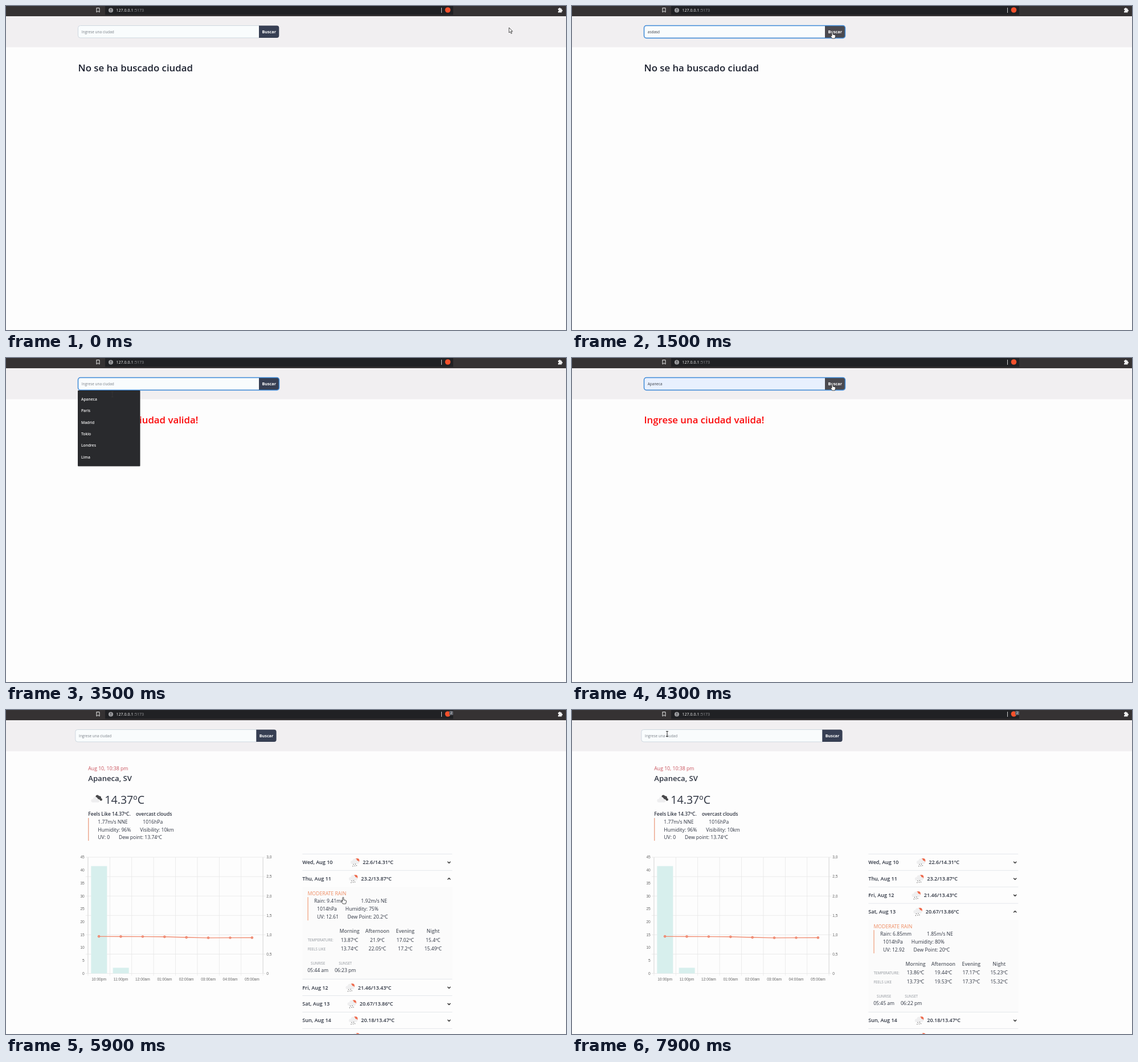
An HTML page with a canvas that plays this animation: 983x570 px, repeating every 8000 ms.

```html
<!DOCTYPE html>
<html lang="es">
<head>
<meta charset="utf-8">
<title>Clima</title>
<style>
html, body { margin: 0; width: 100%; height: 100%; overflow: hidden; background: #fdfdfd; }
canvas { display: block; }
</style>
</head>
<body>
<canvas id="stage" width="983" height="570"></canvas>
<script>
const c = document.getElementById('stage').getContext('2d');
const LOOP = 8000, STEP = 100, INK = '#2d3340', ORANGE = '#ee8a5f';
const UI = '"Open Sans", "Noto Sans", sans-serif', CHART = '"Liberation Sans", Arial, sans-serif';
const ROW = 28.95, PANEL = 162.3, LIST_TOP = 253.3;

// time, x, y, shape of the pointer
const pointer = [
  [0, 883, 38, 'arrow'], [100, 840, 45, 'arrow'], [300, 485, 79, 'arrow'], [500, 210, 52, 'beam'],
  [600, 202, 50, 'beam'], [1200, 202, 50, 'beam'], [1500, 457, 45, 'hand'], [1800, 457, 45, 'hand'],
  [1900, 423, 72, 'arrow'], [2000, 385, 90, 'arrow'], [2100, 304, 155, 'arrow'], [2200, 263, 187, 'arrow'],
  [2300, 263, 187, 'arrow'], [2400, 215, 110, 'arrow'], [2500, 194, 46, 'beam'], [2600, 194, 46, 'beam'],
  [2800, 197, 60, 'beam'], [2900, 196, 52, 'beam'], [3300, 196, 52, 'beam'], [3600, 182, 70, 'arrow'],
  [3800, 182, 70, 'arrow'], [4100, 457, 45, 'hand'], [4600, 457, 45, 'hand'], [4900, 500, 150, 'arrow'],
  [5200, 586, 276, 'hand'], [5300, 588, 282, 'hand'], [5500, 588, 290, 'hand'], [5800, 588, 292, 'hand'],
  [6200, 603, 440, 'beam'], [6400, 605, 484, 'hand'], [6600, 605, 484, 'hand'], [6700, 605, 484, 'beam'],
  [7000, 605, 512, 'hand'], [7200, 605, 512, 'hand'], [7500, 470, 330, 'arrow'], [7700, 290, 150, 'arrow'],
  [7900, 167, 42, 'beam'], [8000, 167, 42, 'beam']
];

const days = [
  ['Wed, Aug 10', 631, '22.6/14.31ºC'], ['Thu, Aug 11', 628, '23.2/13.87ºC'],
  ['Fri, Aug 12', 622.5, '21.46/13.43ºC'], ['Sat, Aug 13', 625.5, '20.67/13.86ºC'],
  ['Sun, Aug 14', 628, '20.18/13.47ºC'], ['Mon, Aug 15', 631.5, '19.33/13.89ºC'],
  ['Tue, Aug 16', 627, '18.58/13.94ºC'], ['Wed, Aug 17', 631, '19.06/13.54ºC']
];

const panels = {
  1: { from: 5530, to: 6515, rain: '9.41mm', wind: '1.92m/s NE', windX: 628, hum: '75%', uv: '12.61', dew: '20.2ºC',
    temp: ['13.87', '21.9', '17.02', '15.4'], feel: ['13.74', '22.05', '17.2', '15.49'], sun: ['05:44 am', '06:23 pm'] },
  2: { from: 6515, to: 7130, rain: '15.05mm', wind: '1.97m/s ENE', windX: 632.2, hum: '77%', uv: '13.09', dew: '20.48ºC',
    temp: ['13.43', '20.59', '16.28', '15.02'], feel: ['13.28', '20.72', '16.47', '15.08'], sun: ['05:45 am', '06:23 pm'] },
  3: { from: 7130, to: 9000, rain: '6.85mm', wind: '1.85m/s NE', windX: 627.7, hum: '80%', uv: '12.92', dew: '20ºC',
    temp: ['13.86', '19.44', '17.17', '15.23'], feel: ['13.73', '19.53', '17.37', '15.32'], sun: ['05:45 am', '06:22 pm'] }
};

const clamp = v => Math.max(0, Math.min(1, v));

// cubic-bezier(.25, .1, .25, 1)
function ease(x) {
  if (x <= 0 || x >= 1) return clamp(x);
  let lo = 0, hi = 1, s;
  for (let i = 0; i < 20; i++) {
    s = (lo + hi) / 2;
    if (.75 * s * (1 - s) + s ** 3 < x) lo = s; else hi = s;
  }
  return .3 * s * (1 - s) ** 2 + 3 * s * s * (1 - s) + s ** 3;
}

// y is the middle of the capital letters
function text(s, x, y, size, color = INK, weight = 400, align = 'left', family = UI) {
  c.font = `${weight} ${size}px ${family}`;
  c.textAlign = align;
  c.fillStyle = color;
  c.fillText(s, x, y + size * .36);
}

function rect(x, y, w, h, color) { c.fillStyle = color; c.fillRect(x, y, w, h); }

function round(x, y, w, h, r, fill, stroke, width = 1) {
  c.beginPath();
  c.roundRect(x, y, w, h, r);
  if (fill) { c.fillStyle = fill; c.fill(); }
  if (stroke) { c.strokeStyle = stroke; c.lineWidth = width; c.stroke(); }
}

function line(points, color, width = 1) {
  c.beginPath();
  points.forEach(([x, y]) => c.lineTo(x, y));
  c.strokeStyle = color;
  c.lineWidth = width;
  c.stroke();
}

function dot(x, y, r, color) {
  c.beginPath();
  c.arc(x, y, r, 0, 7);
  c.fillStyle = color;
  c.fill();
}

function shape(path, x, y, fill, stroke) {
  c.save();
  c.translate(x, y);
  const p = new Path2D(path);
  c.fillStyle = fill;
  c.fill(p);
  if (stroke) { c.strokeStyle = stroke; c.lineWidth = .8; c.stroke(p); }
  c.restore();
}

function pointerAt(t) {
  const i = pointer.findIndex(k => k[0] > t);
  const a = pointer[i - 1], b = pointer[i], p = (t - a[0]) / (b[0] - a[0]);
  return { x: a[1] + (b[1] - a[1]) * p, y: a[2] + (b[2] - a[2]) * p, kind: a[3] };
}

function drawPointer({ x, y, kind }) {
  if (kind === 'arrow') shape('M0 0V9L2 7.2L3.7 10.5L5.1 9.8L3.5 6.6H6.2Z', x, y, '#fff', '#222');
  else if (kind === 'hand') shape('M-1 1Q0-.6 1 1V5L5 6Q6 6.5 5.5 9L4.5 12H-.5L-3 8Q-3.5 6.5-2 7L-1 8Z', x, y, '#fff', '#222');
  else {
    line([[x, y - 4], [x, y + 4]], '#333');
    for (const d of [-4.5, 4.5]) line([[x - 2, y + d], [x + 2, y + d]], '#333');
  }
}

function browserBar(t) {
  rect(0, 0, 983, 18, '#353233');
  rect(174, 0, 611, 15.5, '#202124');
  line([[159, 3.5], [164, 3.5], [164, 11], [161.5, 9], [159, 11], [159, 3]], '#eee');
  dot(184, 7.5, 4.1, '#9a9b9e');
  rect(183.5, 5, 1, 3, '#202124');
  rect(183.5, 9, 1, 1, '#202124');
  text('127.0.0.1', 193.5, 7.5, 7.1, '#f1f1f1');
  text(':5173', 224, 7.5, 7.1, '#96979a');
  rect(764, 3, 1, 9, '#ccc');
  dot(775.5, 7, 4.8, '#f4512c');
  if (t >= 4700) {
    round(778, 1.5, 7, 7.5, 1.5, '#5d6068');
    text('2', 781.5, 5.2, 5.5, '#fff', 400, 'center');
  }
  rect(969, 4.5, 6.5, 7, '#eee');
  dot(972, 4.5, 1.6, '#eee');
  dot(975.5, 8, 1.6, '#eee');
  dot(969.2, 8, 1.2, '#353233');
}

function searchForm(t, mouse) {
  const focus = t >= 600 && t < 1800 || t >= 3300 && t < 4500;
  const picked = t >= 3800 && t < 4500;
  const typed = picked ? 'Apaneca' : t >= 800 && t < 1800 ? 'asdasd'.slice(0, 1 + (t - 800) / 100) : '';
  const over = mouse.x > 444 && mouse.x < 479 && mouse.y > 34 && mouse.y < 57;
  round(126.5, 34.5, 318, 21.5, [4, 0, 0, 4], picked ? '#e8f0fe' : '#f9fcfd', '#cfd8e0');
  round(444, 34.5, 35.3, 21.5, [0, 4, 4, 0], over ? '#4b4a50' : '#373f53');
  text('Buscar', 461.7, 45.5, 7.2, '#fff', 700, 'center');
  if (focus) round(126.5, 34.5, 353, 22, 4, null, '#3f8ad8', 1.5);
  text(typed || 'Ingrese una ciudad', 132.8, 46, 6.45, typed ? '#3a3f48' : '#7c828a');
  if (focus && !picked && t < 1500) rect(133 + (typed ? c.measureText(typed).width : 0), 41, .8, 9, '#222');
}

function suggestions(t) {
  const all = t >= 600 && t < 800 || t >= 3300 && t < 3800;
  if (!all && !(t >= 800 && t < 900)) return;
  const cities = ['Apaneca', 'Paris', 'Madrid', 'Tokio', 'Londres', 'Lima'].slice(0, all ? 6 : 2);
  round(126, 57, 109.5, 11 + cities.length * 20.4, 1, '#292a2d');
  if (t >= 3600) rect(126, 62, 109.5, 20.4, '#45464a');
  cities.forEach((s, i) => text(s, 132, 72.3 + i * 20.4, 6.7, '#f4f4f4', 600));
}

function heading(t) {
  const [s, color] = t < 1700 ? ['No se ha buscado ciudad', '#1d2230']
    : t < 1900 || t >= 4400 ? ['Cargando...', '#ffff00'] : ['Ingrese una ciudad valida!', '#fb0708'];
  text(s, 126.5, 108.7, 16.8, color, 600);
}

function cloud(x, y, color) {
  dot(x, y, 3, color);
  dot(x + 4.5, y - 2.5, 4, color);
  dot(x + 9, y, 3, color);
  rect(x, y, 9, 3, color);
}

function current() {
  text('Aug 10, 10:38 pm', 149, 102.5, 8.7, '#c9505a');
  text('Apaneca, SV', 149, 120, 13.1, INK, 600);
  dot(165, 152.3, 2.8, '#48484a');
  dot(168.5, 154.5, 3.2, '#48484a');
  dot(171.5, 157.5, 2.2, '#48484a');
  cloud(157, 159.5, '#eeeeef');
  text('14.37ºC', 178, 157.5, 19.6);
  text('Feels Like 14.37ºC.', 149, 183, 8.5, INK, 600);
  text('overcast clouds', 232.7, 183, 8.5, INK, 600);
  rect(149, 190, 1, 40, '#e5805f');
  [['1.77m/s NNE', 166, '1016hPa', 245], ['Humidity: 96%', 166, 'Visibility: 10km', 240],
   ['UV: 0', 166, 'Dew point: 13.74ºC', 202.7]].forEach(([a, ax, b, bx], i) => {
    text(a, ax, 197 + i * 13.6, 8.6);
    text(b, bx, 197 + i * 13.6, 8.6);
  });
}

function chart(t) {
  const left = 148.6, right = 455.8, top = 259, base = 463.5, step = (right - left) / 8, grow = 1 - (1 - clamp((t - 4650) / 800)) ** 4;
  const label = (s, x, y, align) => text(s, x, y, 6.65, '#666', 400, align, CHART);
  for (let i = 0; i <= 8; i++) rect(left + i * step - .4, top, .8, base - top + 4, '#e7e7e7');
  for (let i = 0; i <= 6; i++) {
    const y = base - i * (base - top) / 6;
    rect(left - 4, y - .4, right - left + 8, .8, '#e7e7e7');
    label(i ? (i / 2).toFixed(1).replace('.', ',') : '0', 462, y, 'left');
  }
  for (let i = 0; i <= 9; i++) label(i * 5, 142.5, base - i * (base - top) / 9, 'right');
  rect(left - .4, top, .8, base - top, '#d5d5d5');
  rect(right - .4, top, .8, base - top, '#d5d5d5');
  [188.9, 10].forEach((h, i) => rect(154 + i * step, base - h * grow, 28, h * grow, '#d7efed'));
  const points = [65.2, 65, 64.9, 64.5, 63.5, 62.7, 62.9, 63].map((h, i) => [left + (i + .5) * step, base - h * grow]);
  line(points, '#f08d72', 1.3);
  points.forEach(([x, y], i) => {
    dot(x, y, 2.2, '#ee7e64');
    dot(x, y, 1.1, '#f2a48f');
    label(`${String((i + 9) % 12 + 1).padStart(2, '0')}:00${i < 2 ? 'pm' : 'am'}`, x, 473.5, 'center');
  });
}

function rainIcon(x, y) {
  dot(x + 10, y - 3, 4, '#ef6a4c');
  cloud(x + 1.5, y, '#efeff0');
  for (const [dx, dy] of [[3, 3], [6.5, 2.5], [2, 6], [5.5, 5.5], [8.5, 5]]) rect(x + dx, y + dy, 1.2, 1.2, '#555');
}

function panel(d, y, h, alpha) {
  c.save();
  c.beginPath();
  c.rect(520, y, 275, h);
  c.clip();
  rect(525, y, 263, h, '#fbfbfb');
  c.globalAlpha = alpha;
  text('MODERATE RAIN', 534.2, y + 11.5, 8.7, ORANGE);
  rect(534.2, y + 18, 1, 41, ORANGE);
  [['Rain: ' + d.rain, 545.7, d.wind, d.windX], ['1014hPa', 550.7, 'Humidity: ' + d.hum, 600.5],
   ['UV: ' + d.uv, 550.7, 'Dew Point: ' + d.dew, 604.3]].forEach(([a, ax, b, bx], i) => {
    text(a, ax, y + 25.2 + i * 13.6, 8.6);
    text(b, bx, y + 25.2 + i * 13.6, 8.6);
  });
  text('TEMPERATURE:', 534.2, y + 93.3, 6.4, '#8f949b');
  text('FEELS LIKE', 534.2, y + 109.2, 6.4, '#8f949b');
  ['Morning', 'Afternoon', 'Evening', 'Night'].forEach((s, i) => {
    const x = 607.7 + i * 48.9;
    text(s, x, y + 77.5, 8.6, '#5a5f68', 600, 'center');
    text(d.temp[i] + 'ºC', x, y + 93.3, 8.6, INK, 400, 'center');
    text(d.feel[i] + 'ºC', x, y + 109.2, 8.6, INK, 400, 'center');
  });
  ['SUNRISE', 'SUNSET'].forEach((s, i) => {
    text(s, 552.3 + i * 48, y + 134.5, 6.2, '#8f949b', 400, 'center');
    text(d.sun[i], 552.3 + i * 48, y + 146.5, 8.6, INK, 400, 'center');
  });
  c.restore();
}

function forecast(t, mouse) {
  let y = LIST_TOP;
  days.forEach(([day, x, range], i) => {
    const d = panels[i], open = d && t >= d.from && t < d.to;
    if (t >= 5600 && mouse.x > 520 && mouse.y >= y && mouse.y < y + ROW) rect(525, y, 263, ROW, '#f5f5f5');
    rect(525, y - .4, 263, .8, '#dfe3e8');
    const mid = y + 14.8;
    text(day, 525, mid, 9, INK, 600);
    rainIcon(x - 20, mid);
    text(range, x, mid, 9, INK, 600);
    const tip = open ? -1.3 : 1.3;
    line([[779.9, mid - tip], [782.4, mid + tip], [784.9, mid - tip]], '#222', 1.3);
    y += ROW;
    if (!d || t < d.from) return;
    const h = PANEL * (open ? ease((t - d.from) / 300) : 1 - ease((t - d.to) / 200));
    const alpha = open ? ease((t - d.from) / 400) : 1 - ease((t - d.to) / 300);
    if (h > 0) panel(d, y, h, alpha);
    y += h;
  });
  rect(525, y - .4, 263, .8, '#dfe3e8');
}

function draw(t) {
  const mouse = pointerAt(t);
  rect(0, 0, 983, 570, '#fdfdfd');
  rect(0, 18, 983, 54.5, '#f1eff1');
  browserBar(t);
  c.save();
  // the page scrollbar pushes the content aside
  if (t >= 5600) c.translate(-4.7, 0);
  searchForm(t, mouse);
  if (t < 4700) heading(t);
  else {
    current();
    chart(t);
    forecast(t, mouse);
  }
  suggestions(t);
  c.restore();
  drawPointer(mouse);
}

const start = performance.now();
function tick() {
  const t = (performance.now() - start) % LOOP;
  draw(Math.floor(t / STEP) * STEP);
  requestAnimationFrame(tick);
}
tick();
</script>
</body>
</html>
```
